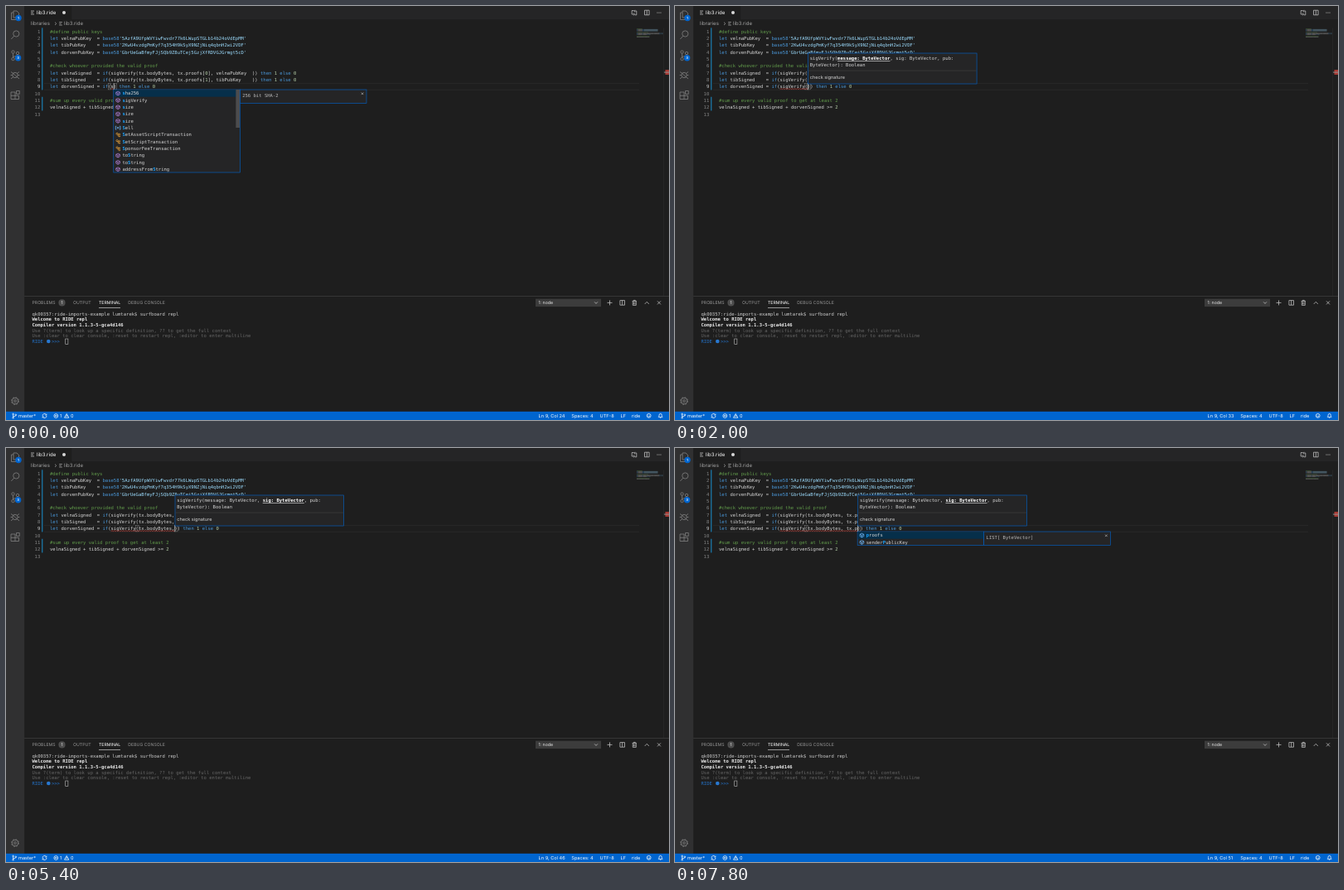
Recreate the animation shown at these times as an HTML page. Size 800 px wide and 500 px high, loop 8000 ms.

```html
<!DOCTYPE html>
<html lang="en">
<head>
<meta charset="utf-8">
<title>Editor autocomplete</title>
<style>
html, body { margin: 0; width: 100%; height: 100%; overflow: hidden; background: #1e1e1e; }
svg { display: block; width: 100%; height: 100%; }
text { white-space: pre; text-rendering: geometricPrecision; font-family: Inter, Roboto, sans-serif; }
.m { font: 5.56px "DejaVu Sans Mono", "Liberation Mono", monospace; }
.b { font-weight: 700; }
.i { fill: none; stroke: #c5c5c5; stroke-width: .75; }
</style>
</head>
<body>
<svg id="stage" viewBox="0 0 800 500" xmlns="http://www.w3.org/2000/svg"></svg>
<script>
const CH = 3.347, LH = 8.335, X0 = 53, Y0 = 26.4;
const LOOP = 8000, STEP = 200;
const BLUE = '#0065cf', KEY = '#4a97d8', WHITE = '#d4d4d4', PANEL = '#252526';

const rect = (x, y, w, h, fill, extra = '') =>
  `<rect x="${x}" y="${y}" width="${w}" height="${h}" fill="${fill}" ${extra}/>`;
const frame = (x, y, w, h, stroke, fill = 'none', sw = .6) =>
  rect(x, y, w, h, fill, `stroke="${stroke}" stroke-width="${sw}"`);
const circle = (x, y, r, fill, extra = '') =>
  `<circle cx="${x}" cy="${y}" r="${r}" fill="${fill}" ${extra}/>`;
const span = (s, fill, extra = '') => `<tspan fill="${fill}" ${extra}>${s}</tspan>`;
const mono = (x, y, s, fill = WHITE, cls = '') =>
  `<text class="m ${cls}" x="${x}" y="${y}" fill="${fill}">${s}</text>`;
const ui = (x, y, s, fill = '#fff', size = 5.6, extra = '') =>
  `<text x="${x}" y="${y}" fill="${fill}" font-size="${size}" ${extra}>${s}</text>`;
const icon = (x, y, d, color = '#c5c5c5', extra = '') =>
  `<path class="i" transform="translate(${x} ${y})" d="${d}" style="stroke:${color}" ${extra}/>`;
const ring = (x, y, r, color, extra = '') =>
  `<circle class="i" cx="${x}" cy="${y}" r="${r}" style="stroke:${color}" ${extra}/>`;
const baseline = n => Y0 + (n - 1) * LH + 6.15;
const colX = n => X0 + n * CH;

const lines = [
  '#define public keys',
  "let velnaPubKey  = base58'5AzfA9UfpWVYiwFwvdr77k6LWupSTGLb14b24oVdEpMM'",
  "let tibPubKey    = base58'2KwU4vzdgPmKyf7q354H9kSyX9NZjNiq4qbnH2wi2VDF'",
  "let dorvenPubKey = base58'GbrUeGaBfmyFJjSQb9Z8uTCej5GzjXfRDVGJGrmgt5cD'",
  '',
  '#check whoever provided the valid proof',
  'let velnaSigned  = if(sigVerify(tx.bodyBytes, tx.proofs[0], velnaPubKey  )) then 1 else 0',
  'let tibSigned    = if(sigVerify(tx.bodyBytes, tx.proofs[1], tibPubKey    )) then 1 else 0',
  '',
  '',
  '#sum up every valid proof to get at least 2',
  'velnaSigned + tibSigned + dorvenSigned >= 2',
  ''
];
const HEAD = 'let dorvenSigned = if(';

function tokenColor(s) {
  if (s[0] === '#') return '#619a4b';
  if (s[0] === "'") return '#9cdcfe';
  if (/^(let|if|then|else|base58)$/.test(s)) return KEY;
  return /^\d+$/.test(s) ? '#b5cea8' : WHITE;
}
const tokens = s => s.match(/^#.*|'[^']*'|\w+|[^\w']+/g) || [];
const codeLine = (n, s) =>
  mono(X0, baseline(n), tokens(s).map(t => span(t, tokenColor(t))).join(''));

function minimap() {
  let out = '';
  lines.forEach((line, row) => {
    let col = 0;
    const s = row === 8 ? HEAD + 'sigVerify() then 1 else 0' : line;
    for (const t of tokens(s)) {
      if (t.trim()) out += rect(761 + col * .36, 27 + row * .93, t.length * .36, .6, tokenColor(t), 'opacity=".45"');
      col += t.length;
    }
  });
  return out;
}

// Suggestion rows: kind letter, then label; * marks a matched character.
const fields = ['fbodyBytes', 'fid', 'fproofs', 'fsender', 'fsenderPublicKey', 'ftimestamp'];
const lists = {
  s: ['256 bit SHA-2', 'c*sha256', 'c*sigVerify', 'c*size', 'c*size', 'c*size', 'v*Sell',
    'k*SetAssetScriptTransaction', 'k*SetScriptTransaction', 'k*SponsorFeeTransaction',
    'cto*String', 'cto*String', 'caddressFrom*String'],
  si: ['check signature', 'c*s*igVerify', 'c*s*ize', 'c*s*ize', 'c*s*ize',
    'cto*Str*ing', 'cto*Str*ing', 'caddressFrom*Str*ing'],
  t: ['Processing transaction', 'v*tx', 'c*take', 'c*take', 'c*throw', 'c*throw', 'c*toBytes',
    'c*toString', 'c*toString', 'k*TransferTransaction'],
  tx: ['Processing transaction', 'v*t*x', 'n{-# CONTENT_*TYPE E*XPRESSION #-}'],
  dot: ['ByteVector', ...fields],
  b: ['ByteVector', 'f*bodyBytes', 'fsenderPu*blicKey'],
  p: ['LIST[ ByteVector]', 'f*proofs', 'fsender*PublicKey']
};

// Step, typed text, open list, active parameter.
const CALL = 'sigVerify(', BODY = CALL + 'tx.bodyBytes';
const states = [
  [0, 's', 's'],
  [2, 'si', 'si'],
  [3, 'sigVerify'],
  [8, CALL, '', 0],
  [12, CALL + 't', 't', 0],
  [13, CALL + 'tx', 'tx', 0],
  [14, CALL + 'tx.', 'dot', 0],
  [18, CALL + 'tx.b', 'b', 0],
  [20, BODY, '', 0],
  [25, BODY + ',', '', 1],
  [29, BODY + ', ', '', 1],
  [31, BODY + ', t', 't', 1],
  [33, BODY + ', tx', 'tx', 1],
  [36, BODY + ', tx.', 'dot', 1],
  [38, BODY + ', tx.p', 'p', 1]
];

const CUBE = 'M0-2.4L2.3-1.2V1.2L0 2.4L-2.3 1.2V-1.2ZM-2.3-1.2L0 0L2.3-1.2M0 0V2.4';
const LIST_ICON = 'M-2-2H2M-2 0H1M-2 2H2';
const CROSS = 'M-1.7-1.7L1.7 1.7M1.7-1.7L-1.7 1.7';
const SPLIT = 'M-2.8-2.8H2.8V2.8H-2.8ZM0-2.8V2.8';

function kindIcon(kind, x, y) {
  if (kind === 'c') return icon(x, y, CUBE, '#b180d7');
  if (kind === 'f') return icon(x, y, CUBE, '#75beff');
  if (kind === 'k') return icon(x, y, 'M-2.4-1.2L-1-2.5L.4-1.2L-1 .1ZM-.4-.6H2.6M.2-.6V1.8H2.6M1.6-1.6L2.7-.6L1.6.4M1.6.8L2.7 1.8L1.6 2.8', '#e8a33a');
  if (kind === 'v') return icon(x, y, 'M-1.8-2H-2.8V2H-1.8M1.8-2H2.8V2H1.8M-1.2 0L0-1L1.2 0L0 1Z', '#75beff');
  return icon(x, y, 'M-1.5-2.3H1L2.2-1V2.4H-1.5ZM-2.5-2.5V-.8M-3.3-1.6H-1.7', '#d4d4d4');
}

function suggest(x, [detail, ...rows]) {
  const y = 101, w = 152.6, h = rows.length * LH;
  let out = frame(x, y, w, h, BLUE, PANEL) + rect(x + .4, y + .3, w - .8, LH, '#062f4a');
  rows.forEach((row, i) => {
    const label = row.slice(1).replace(/\*(.)/g, (_, c) => span(c, '#18a3ff', 'class="b"'));
    out += kindIcon(row[0], x + 5.3, y + i * LH + 4.5) + mono(x + 10.6, y + i * LH + 6.4, label);
  });
  if (rows.length > 11) out += rect(x + w - 5, y, 4.6, 46, '#4c4c4e');
  const dx = x + w;
  return out + frame(dx, y, w, 16.6, BLUE, PANEL) + mono(dx + 2.8, y + 8.7, detail, '#b8b8b8') +
    icon(dx + w - 5, y + 4.8, 'M-1.3-1.3L1.3 1.3M1.3-1.3L-1.3 1.3', '#aaa', 'stroke-width=".5"');
}

function hint(x, active) {
  const params = ['message: ByteVector', 'sig: ByteVector'].map((p, i) =>
    i === active ? span(p, '#fff', 'class="b" text-decoration="underline"') : p);
  return frame(x + .4, 57, 203.6, 37, BLUE, PANEL) +
    mono(x + 2.6, 65, `sigVerify(${params.join(', ')}, pub:`) +
    mono(x + 2.6, 73.3, 'ByteVector): Boolean') +
    rect(x + .8, 77.8, 202.8, .5, '#454545') +
    ui(x + 2.6, 87.9, 'check signature', WHITE);
}

function squiggle(from, to) {
  let d = `M${from} 100.6`;
  for (let x = from, up = 1; x < to; x += 1.4, up = -up) d += `l1.4 ${-up * .9}`;
  return `<path d="${d}" fill="none" stroke="#e0483e" stroke-width=".6"/>`;
}

function activityBar() {
  const c = '#858585';
  const badge = (x, y, s) => circle(x, y, 3.7, BLUE) +
    ui(x, y + 1.5, s, '#fff', 4.2, 'text-anchor="middle" font-weight="600"');
  return rect(0, 0, 22.2, 490, '#303031') +
    icon(11, 11, 'M-2-5H2L4.5-2.5V3H-2ZM-2-3H-4.5V5.5H2V3', c, 'stroke-width="1"') + badge(15, 14.5, 1) +
    ring(12.3, 33.5, 3.6, c) + icon(11, 35, 'M-1.3 1.3L-4.7 5', c) +
    ring(8.5, 55.5, 1.7, c) + ring(14, 57, 1.7, c) + ring(8.5, 64, 1.7, c) +
    icon(8.5, 60, 'M0-2.7V2.2M5.5-1.2C5.5 1.5 0 0 0 2', c) + badge(14.6, 62.8, 3) +
    ring(11, 83.5, 3.2, c) +
    icon(11, 83.5, 'M-5-4L-2.4-2M5-4L2.4-2M-5.4 0H-3.2M5.4 0H3.2M-5 4.4L-2.4 2.2M5 4.4L2.4 2.2M-2.3-2.2L2.3 2.3', c) +
    icon(11, 107.5, 'M-5-3.5H0V5H-5ZM-5 .8H4.5V5H0M1.5-5H5.3V-1.2H1.5Z', c) +
    ring(11, 477, 4.4, c, 'stroke-dasharray="1.9 1.56" stroke-width="1.6"') +
    ring(11, 477, 3.7, c) + ring(11, 477, 1.4, c);
}

function topBar() {
  return rect(22.2, 0, 778, 16.2, PANEL) + rect(22.2, 0, 57, 16.4, '#1e1e1e') +
    icon(32, 8, LIST_ICON) + ui(37, 10.2, 'lib3.ride', '#fff', 6.1) + circle(70, 8, 2, '#d8d8d8') +
    icon(758, 8, 'M-1-2.5H-2.8V2H.5M-.7.8L.6 2L-.7 3.2M1 2.8H2.8V-2H-.3M.8-3.2L-.4-2L.8-.8') +
    icon(773.3, 8, SPLIT) +
    [786, 788, 790].map(x => circle(x, 8, .6, '#c5c5c5')).join('') +
    ui(30, 23.4, 'libraries', '#a3a3a3', 6.05) + icon(60, 21.3, 'M-1-1.7L.8 0L-1 1.7', '#a3a3a3') +
    icon(66, 21.3, 'M-1.8-1.8H1.8M-1.8 0H.8M-1.8 1.8H1.8', '#a3a3a3') + ui(70, 23.4, 'lib3.ride', '#a3a3a3', 6.05);
}

function editor() {
  let out = rect(46, 93.1, 718, .5, '#303030') + rect(46, 100.9, 718, .5, '#303030');
  lines.forEach((s, i) => {
    out += `<text class="m" x="41.3" y="${baseline(i + 1)}" text-anchor="end" fill="${i === 8 ? '#c6c6c6' : '#858585'}">${i + 1}</text>`;
    if (s) out += codeLine(i + 1, s);
  });
  return out + rect(43, Y0, 1.4, LH * 9, '#1b6f9c') + rect(43, Y0 + LH * 10, 1.4, LH * 2, '#1b6f9c') +
    minimap() + rect(793.4, Y0, .4, 324, '#333') +
    rect(795.5, 77, 4.5, 6, '#a83a34') + rect(794, 79.6, 6, .9, '#9a9a9a');
}

function terminal() {
  const gray = '#979797', y = 360.3;
  const row = (n, s, fill, cls) => mono(31.5, 373.6 + n * 6.68, s, fill, cls);
  return rect(22.2, 350.2, 777.8, .6, '#464646') +
    ui(31.5, y, 'PROBLEMS', gray, 5.2) + circle(67.5, 358.4, 4.1, '#4d4d4d') +
    ui(67.5, y - .1, '1', '#fff', 5, 'text-anchor="middle"') +
    ui(81, y, 'OUTPUT', gray, 5.2) + ui(112, y, 'TERMINAL', '#fff', 5.2) +
    rect(112, 364.2, 26, .6, '#e7e7e7') + ui(147.3, y, 'DEBUG CONSOLE', gray, 5.2) +
    rect(639, 353.7, 79, 9.4, '#3c3c3c') + ui(642.5, 360.4, '1: node', '#f0f0f0', 5.2) +
    icon(712, 358.4, 'M-1.9-1L0 1L1.9-1') + icon(728.5, 358.4, 'M-3 0H3M0-3V3') + icon(743.7, 358.4, SPLIT) +
    icon(758.3, 358.4, 'M-2.6-2H2.6M-1-2V-3H1V-2M-2-2V3H2V-2M-.7-.8V2M.7-.8V2') +
    icon(773.3, 358.6, 'M-2.5 1.3L0-1.3L2.5 1.3') + icon(788, 358.4, CROSS.replace(/1\.7/g, '2')) +
    row(0, 'qk00357:ride-imports-example lumtarek$ surfboard repl', '#ccc') +
    row(1, 'Welcome to RIDE repl', '#e8e8e8', 'b') +
    row(2, 'Compiler version 1.1.3-5-gca4d146', '#e8e8e8', 'b') +
    row(3, 'Use ?(term) to look up a specific definition, ?? to get the full context', '#666') +
    row(4, 'Use :clear to clear console, :reset to restart repl, :editor to enter multiline', '#666') +
    row(5, 'RIDE   >>>', '#2472c8') + circle(51.3, 405, 2.3, '#2878d0') +
    frame(71.7, 402, 3.2, 6.4, '#bbb', 'none', .6);
}

function statusBar() {
  const w = '#fff', y = 497.1;
  return rect(0, 489.8, 800, 10.2, BLUE) +
    ring(8.6, 492.9, .8, w) + ring(8.6, 497.3, .8, w) + ring(11.8, 493.8, .8, w) +
    icon(8.6, 495, 'M0-1.3V1.5M3.2-.4C3.2 1 0 .2 0 1.5', w) + ui(15, y, 'master*') +
    icon(46.5, 495, 'M-2.4.3A2.4 2.4 0 0 1 2-1.4M2.4-.3A2.4 2.4 0 0 1-2 1.4M2.4-2.4V-1H.8M-2.4 2.4V1H-.8', w) +
    ring(60.3, 495, 2.4, w) + icon(60.3, 495, 'M-1-1L1 1M1-1L-1 1', w) + ui(65, y, '1') +
    icon(73.2, 495, 'M0-2.5L2.7 2.2H-2.7ZM0-1V1', w) + ui(78, y, '0') +
    ui(682.3, y, 'Spaces: 4') + ui(716.5, y, 'UTF-8') + ui(741.6, y, 'LF') + ui(755, y, 'ride') +
    ring(775.7, 494.8, 2.4, w) + icon(775.7, 494.8, 'M-1.2.6Q0 1.9 1.2.6M-.9-.9V-.4M.9-.9V-.4', w) +
    icon(789.7, 494.8, 'M-2.4 1.6Q-1.6.8-1.6-.6Q-1.6-2.4 0-2.4T1.6-.6Q1.6.8 2.4 1.6ZM-.6 2.5H.6', w);
}

function typing([, typed, list, active]) {
  const call = typed.includes('('), start = HEAD.length, col = start + typed.length;
  const x = colX(col), open = call ? start + CALL.length - 1 : start - 1;
  const bracket = c => frame(colX(c), 93.5, CH, 7.4, '#888', 'none', .45);
  return bracket(open) + bracket(col) +
    codeLine(9, HEAD + typed + (call ? '))' : ')') + ' then 1 else 0') +
    squiggle(colX(start), x) + rect(x - .2, 93.3, .8, 7.9, '#aeafad') +
    (active === undefined ? '' : hint(x, active)) +
    (list ? suggest(x - .2, lists[list]) : '') +
    ui(642.6, 497.1, `Ln 9, Col ${col + 1}`);
}

const stage = document.getElementById('stage');
stage.innerHTML = rect(0, 0, 800, 500, '#1e1e1e') + activityBar() + topBar() + editor() +
  terminal() + statusBar() + '<g id="live"></g>';
const live = document.getElementById('live');

let shown = null;
function render(ms) {
  const step = Math.floor(ms % LOOP / STEP);
  const state = states.filter(s => s[0] <= step).pop();
  if (state !== shown) live.innerHTML = typing(shown = state);
}

const began = performance.now();
function tick() {
  render(performance.now() - began);
  requestAnimationFrame(tick);
}
tick();
</script>
</body>
</html>
```
